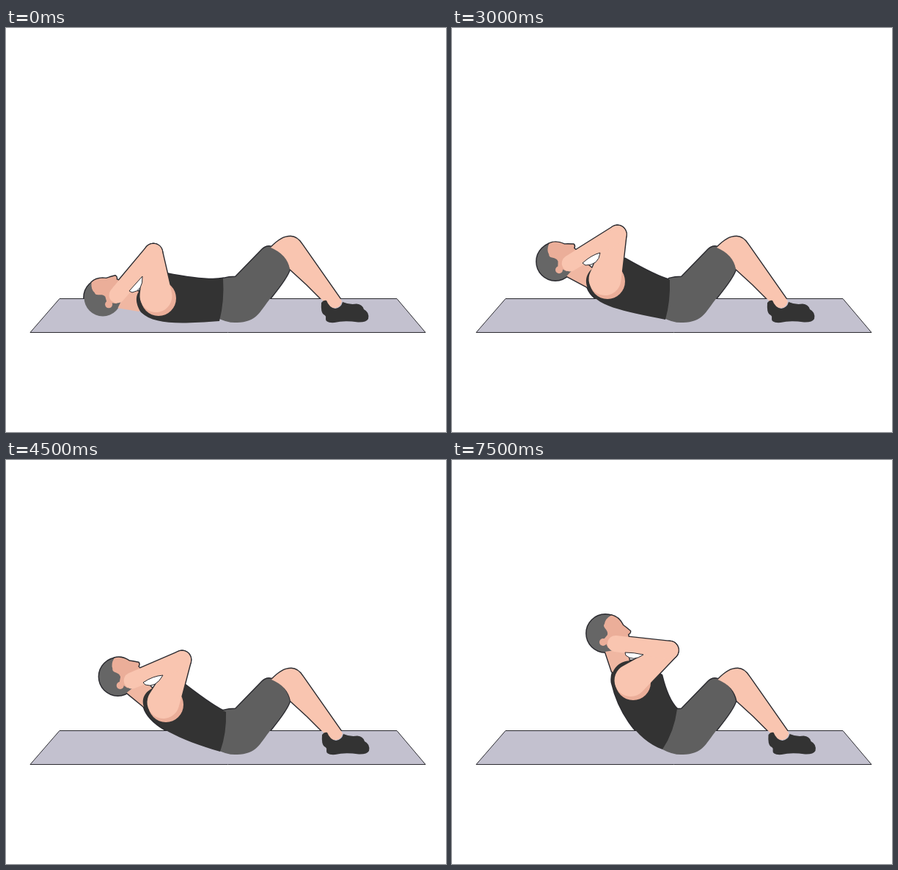
Write an HTML page with a canvas that moves like this. It is 600 by 550 pixels and loops after 8 s.

```html
<!DOCTYPE html>
<html lang="en">
<head>
<meta charset="utf-8">
<title>Crunch exercise</title>
<style>
html, body { margin: 0; width: 100%; height: 100%; overflow: hidden; background: #fff; }
canvas { display: block; width: 600px; height: 550px; }
</style>
</head>
<body>
<canvas id="stage" width="600" height="550"></canvas>
<script>
const ctx = document.getElementById('stage').getContext('2d');
const LOOP = 8000, HOLD = 1500, MAT_TOP = 368;
const SKIN = '#f9c5b0', SHADE = '#ebae99', NECK = '#f0b7a2', HAIR = '#666';
const SHIRT = '#333', SHORTS = '#5f5f5f', MAT = '#c3c1cf', LINE = '#2b2b30';

// One entry per held pose, from lying to raised.
const heads = [[132, 367, -55], [134, 348, -49], [141, 318, -38], [152.5, 295, -29], [175, 264, -17], [209, 236, 0]];
const shoulders = [[207, 367], [207, 359], [211, 344], [217, 332], [228, 316], [246, 302]];
const elbows = [[201, 306], [209.5, 295.5], [225.5, 281], [240, 272], [265.5, 262.5], [296.5, 259]];
const collars = [[181, 386], [180, 368], [185, 353], [188, 336], [200, 312], [218, 288]];
const legShift = [0, 0, 0, 1, 1.5, 1.5];
const torsos = [
  'M184 356C174 364 178 378 184 387C202 404 236 403 291 399Q298 372 296 341Q275 345 218 334Z',
  'M188 342C176 350 176 358 180 368C192 393 232 394 291 398Q298 372 297 342Q268 342 222 325Z',
  'M199 323C184 330 180 342 185 354C195 379 232 385 291 397Q298 372 297 343Q280 339 236 314Z',
  'M204 309C190 314 184 324 188 336C195 361 236 381 292 397Q301 372 300 343Q286 338 243 305Z',
  'M221 290C203 293 197 304 200 316C207 341 238 377 290 397Q302 372 304 342Q290 338 263 297Z',
  'M246 273C226 273 216 286 218 303C226 338 250 381 287 394Q303 370 307 339Q294 326 286 293Z'
];
const gaps = [
  'M168 358L186 338Q187 358 172 360Z',
  'M170 343L190 324Q192 346 174 346Z',
  'M178 320Q190 309 202 306Q200 323 182 323Z',
  'M187 303Q200 294 214 293Q204 311 190 306Z',
  'M207 281Q220 276 235 277Q222 292 207 284Z',
  'M236 262Q248 262 261 265Q247 275 237 266Z'
];

const mat = new Path2D('M73 368.500H533L572 414.500H33Z');
const shorts = new Path2D('M296 341Q304 339 313 339L349 302Q355 296 362 298Q382 306 387 328Q384 339 362 366C344 389 342 400 315 401Q302 402 287 394Z');
const leg = new Path2D('M361 299C372 288 379 284 388 284Q397 284 404 295L458 372Q456 381 448 381Q441 381 436 375L410 349L387 328Q383 308 361 299Z');
const shoe = new Path2D('M430 374Q433 370 437 371Q441 381 449 382Q457 381 459 373Q468 377 478 375.500Q486 376 488 383Q496 387 494 396Q491 401 480 400.500Q461 398 448 401Q435 402 436 395Q437 392 433 390Q429 387 430 374Z');
const face = new Path2D('M8-24.500C16-23 21-17 24-11L28-8L34-3Q34 0 31 1L32 7Q30 14 20 17L4 20L-2 8L3 2C5-5-5-8-1-13Q0-20 8-24.500Z');

function circle([x, y], r) {
  const path = new Path2D();
  path.arc(x, y, r, 0, Math.PI * 2);
  return path;
}

function polygon(points) {
  const path = new Path2D();
  points.forEach(p => path.lineTo(...p));
  path.closePath();
  return path;
}

// Limb bounded by two circles and their common tangents.
function limb([ax, ay], ra, [bx, by], rb) {
  const path = new Path2D();
  const angle = Math.atan2(by - ay, bx - ax);
  const spread = Math.acos((ra - rb) / Math.hypot(bx - ax, by - ay));
  path.arc(ax, ay, ra, angle + spread, angle - spread);
  path.arc(bx, by, rb, angle - spread, angle + spread);
  path.closePath();
  return path;
}

function moved(path, x, y, deg = 0) {
  const result = new Path2D();
  result.addPath(path, new DOMMatrix().translate(x, y).rotate(deg));
  return result;
}

function figure(i) {
  const [hx, hy, deg] = heads[i], [sx, sy] = shoulders[i], elbow = elbows[i];
  const turn = deg * Math.PI / 180, c = Math.cos(turn), s = Math.sin(turn);
  const onHead = (x, y) => [hx + x * c - y * s, hy + x * s + y * c];
  const hand = onHead(14, 14);
  return [
    [SHORTS, shorts],
    [SKIN, moved(leg, legShift[i], 0)],
    [SHIRT, moved(shoe, legShift[i], 0)],
    [HAIR, circle([hx, hy], 25.5)],
    [NECK, polygon([onHead(0, 25), onHead(30, 20), [sx, sy], collars[i]])],
    [SHADE, moved(face, hx, hy, deg)],
    [SHADE, circle(onHead(-3, 12), 5)],
    [SHIRT, new Path2D(torsos[i])],
    [SHADE, circle([sx + 1, sy + 1], 24)],
    [SKIN, limb([sx - 2.5, sy - 2], 22, elbow, 12)],
    [SKIN, limb(hand, 11, elbow, 12)]
  ];
}

const poses = heads.map((_, i) => figure(i));

function draw(i) {
  ctx.fillStyle = '#fff';
  ctx.fillRect(0, 0, 600, 550);
  ctx.lineJoin = 'round';
  ctx.strokeStyle = LINE;
  ctx.lineWidth = 1;
  ctx.fillStyle = MAT;
  ctx.fill(mat);
  ctx.stroke(mat);

  // Contour behind all fills, only where the figure rises above the mat.
  ctx.save();
  ctx.beginPath();
  ctx.rect(0, 0, 600, MAT_TOP);
  ctx.clip();
  ctx.lineWidth = 2.8;
  poses[i].forEach(([, path]) => ctx.stroke(path));
  ctx.restore();
  for (const [color, path] of poses[i]) {
    ctx.fillStyle = color;
    ctx.fill(path);
  }

  const gap = new Path2D(gaps[i]);
  ctx.fillStyle = '#fff';
  ctx.fill(gap);
  ctx.lineWidth = 1;
  ctx.stroke(gap);
}

const start = performance.now();
function tick() {
  const time = (performance.now() - start) % LOOP;
  draw(Math.floor(time / HOLD));
  requestAnimationFrame(tick);
}
tick();
</script>
</body>
</html>
```
